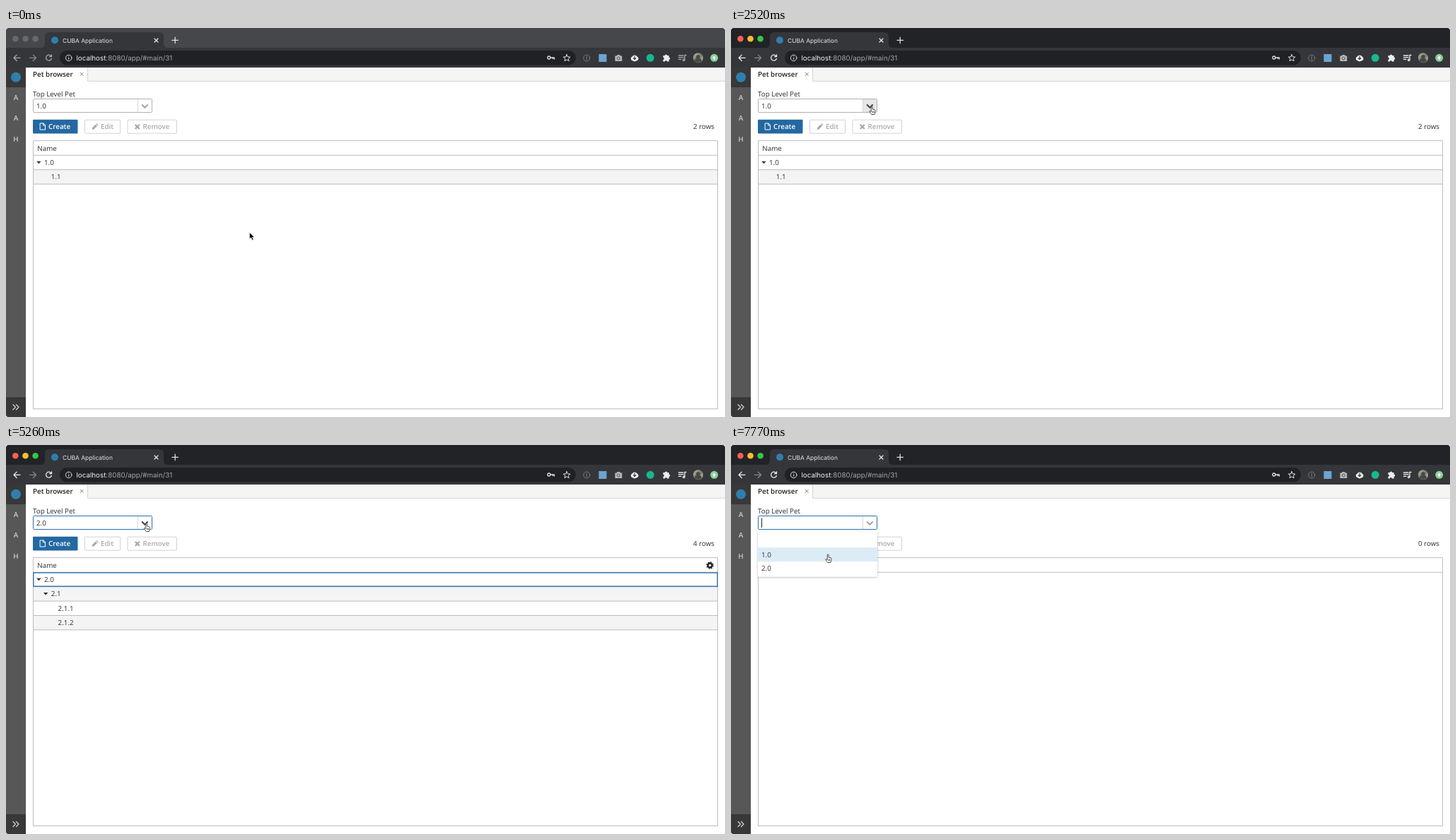
An HTML page that plays this animation: 1017 by 551 pixels, repeating every 8000 ms.

```html
<!DOCTYPE html>
<html lang="en">
<head>
<meta charset="utf-8">
<title>Pet browser</title>
<style>
  html, body { margin: 0; width: 100%; height: 100%; overflow: hidden; background: #fff; }
  svg { display: block; }
  text { font: 9.8px "Open Sans", sans-serif; fill: #2c2c2c; white-space: pre; text-rendering: geometricPrecision; }
  .ui { font-family: Inter, sans-serif; }
  .semi { font-weight: 600; }
  .off { fill: #aaa; }
  .line { fill: none; stroke-linecap: round; stroke-linejoin: round; }
  .tool { stroke: #dfe1e3; stroke-width: 1.3; }
</style>
</head>
<body>
<svg width="1017" height="551" viewBox="0 0 1017 551">
  <clipPath id="window"><rect width="1017" height="551" rx="4"/></clipPath>
  <linearGradient id="portrait" x2="1" y2="1">
    <stop stop-color="#b9bfae"/><stop offset=".5" stop-color="#77786b"/><stop offset="1" stop-color="#d5d0c8"/>
  </linearGradient>
  <filter id="shadow" x="-10%" y="-10%" width="120%" height="130%">
    <feDropShadow dx="0" dy="1" stdDeviation="1.6" flood-opacity=".28"/>
  </filter>
  <g clip-path="url(#window)">
    <!-- browser chrome -->
    <rect id="strip" width="1017" height="29"/>
    <path d="M49 28q6 0 6-6V12q0-6 6-6H217q6 0 6 6V22q0 6 6 6V29H49z" fill="#35363a"/>
    <rect y="28" width="1017" height="28" fill="#35363a"/>
    <g id="lights"><circle cx="13.3" cy="15.3" r="4.3"/><circle cx="27.5" cy="15.3" r="4.3"/><circle cx="41.6" cy="15.3" r="4.3"/></g>
    <circle cx="69" cy="17.3" r="5" fill="#2e7fad"/>
    <text class="ui" x="80" y="20.5" style="font-size:8.45px;fill:#e4e5e7">CUBA Application</text>
    <path class="line tool" d="M210 15l5 5m0-5l-5 5M235 17.4h8.4m-4.2-4.2v8.4"/>
    <path id="back" class="line" stroke-width="1.3" d="M20 42.3h-9m4.2-4.2L11 42.3l4.2 4.2"/>
    <path class="line" stroke="#85878b" stroke-width="1.3" d="M33.5 42.3h9m-4.2-4.2l4.2 4.2-4.2 4.2"/>
    <path id="reload" class="line" stroke-width="1.3" d="M64 40a4 4 0 1 0 .4 3.5M64.5 37.8v2.7h-2.8"/>
    <rect x="76" y="32" width="730" height="20.5" rx="10.2" fill="#202124"/>
    <g class="line" stroke="#dadce0"><circle cx="88.7" cy="42.4" r="4.3"/><path d="M88.7 42v2.5m0-4.6v.2"/></g>
    <text class="ui" x="99.5" y="45.8" style="fill:#a1a5aa"><tspan fill="#f1f2f3">localhost</tspan>:8080/app/#main/31</text>
    <g class="line" stroke="#e2e3e5" stroke-width="1.3">
      <circle cx="768" cy="42" r="2"/><path d="M770.5 42h5v2m-2-2v1.5"/>
      <path stroke-width="1" d="M793.2 37.6l1.4 3.2 3.5.3-2.7 2.2.9 3.4-3.1-1.8-3.1 1.8.9-3.4-2.7-2.2 3.5-.3z"/>
    </g>
    <g class="line" stroke="#77797d"><circle cx="821.3" cy="42.5" r="4.5"/><path d="M821.3 40v5"/></g>
    <rect x="838.5" y="37" width="11" height="11" fill="#6aa5d3"/>
    <path d="M861.5 39.5h2.3l1-1.5h3.2l1 1.5h2.3v7.5h-9.8z" fill="#b7b9bb"/>
    <circle cx="866.4" cy="43" r="2" fill="none" stroke="#55575a"/>
    <path d="M885.5 46a3 3 0 0 1 .3-5.500 3.800 3.800 0 0 1 6.800 0 3 3 0 0 1 .3 5.500l-3.700 1.500z" fill="#f0f1f2"/>
    <path class="line" stroke="#35363a" stroke-width="1.2" d="M889.2 40v4.5m-1.8-1.8l1.8 1.8 1.8-1.8"/>
    <circle cx="911.3" cy="42.3" r="5.5" fill="#17b890"/>
    <path d="M929.5 39h2.5a1.6 1.6 0 0 1 3.2 0h2.5v2.6a1.6 1.6 0 0 1 0 3.2v2.7h-2.7a1.5 1.5 0 0 0-3 0h-2.5v-2.7a1.5 1.5 0 0 0 0-3z" fill="#eceded"/>
    <g id="queue" class="line" stroke-width="1.3"><path d="M951.5 39h6.5m-6.5 2.7h6.5m-6.5 2.7h3.5M960 45v-6.5h2"/><circle cx="958.7" cy="45.3" r="1.2"/></g>
    <circle cx="979" cy="42.3" r="7" fill="url(#portrait)"/>
    <path d="M974 47q0-4 3-4a2.8 2.8 0 1 1 4 0q3 0 3 4-5 4-10 0z" fill="#484a42"/>
    <circle cx="1001.7" cy="42.3" r="5.5" fill="#8ccf9a"/>
    <path d="M1001.7 39.5l2.6 3h-1.6v2.3h-2v-2.3h-1.6z" fill="#fff"/>

    <!-- side menu -->
    <rect y="56" width="28" height="495" fill="#575757"/>
    <path d="M0 56h28v28H0zM0 523h28v28H0z" fill="#383838"/>
    <circle cx="14" cy="69.7" r="7" fill="#2e7fad"/>
    <g text-anchor="middle" class="semi">
      <text x="14" y="102" style="fill:#ccc" class="semi">A</text>
      <text x="14" y="131" style="fill:#ccc" class="semi">A</text>
      <text x="14" y="160.5" style="fill:#ccc" class="semi">H</text>
    </g>
    <path class="line" stroke="#ccc" stroke-width="1.4" d="M10 533.5l3.5 3.5-3.5 3.5m4.5-7l3.5 3.5-3.5 3.5"/>

    <!-- screen -->
    <rect x="28" y="56" width="989" height="495" fill="#fff"/>
    <path d="M116 56h901v19H116z" fill="#f5f5f5"/>
    <path d="M115.6 56V75.3H1017" fill="none" stroke="#d2d2d2"/>
    <text x="38" y="69" class="semi" style="fill:#222">Pet browser</text>
    <path class="line" stroke="#777" d="M105.2 63.4l4 4m0-4l-4 4"/>
    <text x="38" y="96.5">Top Level Pet</text>
    <rect x="38" y="129.8" width="63.5" height="19.8" rx="1" fill="#2468a1"/>
    <path class="line" stroke="#fff" d="M48.5 135h4.5l2.5 2.5v6.5h-7zM52.7 135v3h2.8"/>
    <text x="60" y="143.2" class="semi" style="fill:#fff">Create</text>
    <g fill="#fff" stroke="#d2d2d2"><rect x="111.5" y="130.2" width="50" height="19" rx="1"/><rect x="172" y="130.2" width="69.5" height="19" rx="1"/></g>
    <path d="M121.5 144l.6-2.7 4.7-4.7 2.2 2.2-4.7 4.7zm5.9-8l1-1 2.2 2.2-1 1z" fill="#aaa"/>
    <text x="134" y="143.2" class="semi off">Edit</text>
    <path stroke="#aaa" stroke-width="2.2" d="M182.8 136.9l6 6m0-6l-6 6"/>
    <text x="193.5" y="143.2" class="semi off">Remove</text>
    <g id="screen"></g>
    <g id="cursor"></g>
  </g>
</svg>
<script>
const $ = id => document.getElementById(id);
const BLUE = '#2d6fa7', ROW = 20.4, ITEM = 19.7;

// start, end, steps, destination of the pointer tip
const moves = [
  [520, 1200, 7, 143, 221.5],
  [1720, 2520, 10, 199, 110.5],
  [2690, 3260, 7, 118.5, 171],
  [4630, 5260, 8, 198.5, 110.5],
  [5490, 6060, 8, 146.8, 140],
  [6740, 7260, 6, 198.5, 110.5],
  [7430, 7770, 5, 137, 154.5]
];
const trees = {
  '1.0': [['1.0', 0, 1], ['1.1', 1, 0]],
  '2.0': [['2.0', 0, 1], ['2.1', 1, 1], ['2.1.1', 2, 0], ['2.1.2', 2, 0]],
  '': []
};
const options = ['', '1.0', '2.0'];
const opened = [[2690, 3540], [5490, 6570], [7430, 8000]];
const caretOn = [[2690, 3200], [3490, 4120], [4630, 5130], [5490, 6060], [6520, 7080], [7430, 8000]];
const pressed = [[3490, 3540], [6520, 6570]];

const during = (t, spans) => spans.some(([a, b]) => t >= a && t < b);
const rect = (x, y, w, h, fill, more = '') =>
  `<rect x="${x}" y="${y}" width="${w}" height="${h}" fill="${fill}" ${more}/>`;
const text = (x, y, s, more = '') => `<text x="${x}" y="${y}" ${more}>${s}</text>`;
const path = (d, more) => `<path d="${d}" ${more}/>`;

function pointer(t) {
  let x = 344.5, y = 289.5;
  for (const [start, end, steps, toX, toY] of moves) {
    if (t < start) break;
    const step = Math.min(steps, 1 + Math.floor((t - start) / (end - start) * (steps - 1) + 1e-6));
    const p = step / steps, ease = p * p * (3 - 2 * p);
    x += (toX - x) * ease;
    y += (toY - y) * ease;
  }
  return { x, y };
}

function table(value, t, tip, open) {
  const rows = trees[value];
  let fills = '', lines = '', labels = '';
  rows.forEach(([name, level, branch], i) => {
    const y = 180.3 + i * ROW, x = 54 + level * 9.8;
    const hover = !open && t > 1720 && tip.x > 39 && tip.y > y && tip.y < y + ROW;
    fills += rect(39, y, 968, ROW, hover ? '#eef4f8' : i % 2 ? '#f4f4f4' : '#fff');
    lines += `M39 ${y + ROW}H1007`;
    labels += text(x, y + 13.7, name);
    if (branch) labels += path(`M${x - 10.8} ${y + 8.4}h6.4l-3.2 3.6z`, 'fill="#333"');
  });
  let out = fills
    + path(lines + 'M38.5 159.6H1006.6V539.5H38.5zM38.5 180.3H1006.6', 'fill="none" stroke="#bcbcbc"')
    + labels;
  if (value === '2.0') out += rect(38.8, 180.9, 967.5, 19.3, 'none', `stroke="${BLUE}" stroke-width="1.4"`);
  out += text(44.3, 173.7, 'Name', 'style="font-weight:500"')
    + text(1002, 143.2, rows.length + ' rows', 'text-anchor="end"');
  if (t >= 3850 && t < 5490) {
    out += '<g fill="none" stroke="#222"><circle cx="995.7" cy="170.5" r="3" stroke-width="2.4"/>'
      + '<circle cx="995.7" cy="170.5" r="4.5" stroke-width="1.5" stroke-dasharray="1.767"/></g>';
  }
  return out;
}

function field(value, t, onButton) {
  const focused = t >= 2690;
  let out = rect(38.5, 100.5, 168, 19, '#fff', 'rx="1"');
  if (onButton && !focused) out += rect(187, 101, 19, 18, '#e6e6e6');
  out += path('M186.5 101v18', 'stroke="#d8d8d8"')
    + rect(38.5, 100.5, 168, 19, 'none', `rx="1" stroke="${focused ? BLUE : '#b0b0b0'}"`)
    + path('M192.7 109l3.7 3.7 3.7-3.7', `class="line" stroke="${onButton ? '#444' : '#a3a3a3'}" stroke-width="2"`)
    + text(43, 114.2, value);
  if (during(t, caretOn)) out += path(`M${value ? 57.5 : 43.5} 103.5v13.5`, 'stroke="#222"');
  return out;
}

function popup(value, t, tip) {
  const hovered = tip.y > 125 ? Math.floor((tip.y - 125.5) / ITEM) : -1;
  const active = hovered >= 0 && hovered < 3 ? hovered : options.indexOf(value);
  const fill = during(t, pressed) ? '#cbe6f7' : '#dbecf7';
  let out = rect(38, 122.5, 169, 64, '#fff', 'filter="url(#shadow)"')
    + rect(38, 125.5 + active * ITEM, 169, ITEM, fill);
  options.forEach((name, i) => out += text(43, 139 + i * ITEM, name));
  return out;
}

const arrow = path('M0 0V9.3L2.2 7.4 3.9 11.2 5.5 10.5 3.9 6.8H6.7z', 'fill="#000" stroke="#fff" stroke-width=".6"');
const hand = path('M-.7 6.8V1.2a.9.9 0 0 1 1.8 0V4.6l2.9.6q1.1.3 1 1.5l-.4 2.9-.7 2.4H-.2L-3 8.2q-.6-1.3.6-1.3l1.7 1.3zM1.2 7.2v2.5M2.8 7.2v2.5',
  'fill="#fff" stroke="#222" stroke-width=".8" stroke-linejoin="round"');

function draw(t) {
  const live = t >= 170;
  $('strip').setAttribute('fill', live ? '#222327' : '#45474a');
  [...$('lights').children].forEach((dot, i) =>
    dot.setAttribute('fill', live ? ['#fb5f57', '#fdbc2e', '#35c648'][i] : '#66686b'));
  for (const id of ['back', 'reload', 'queue']) $(id).setAttribute('stroke', live ? '#eceded' : '#a6a8ab');

  const tip = pointer(t);
  const value = t < 3540 ? '1.0' : t < 6570 ? '2.0' : '';
  const open = during(t, opened);
  const onButton = tip.x > 187 && tip.x < 206 && tip.y > 101 && tip.y < 119;
  const onPopup = open && tip.x < 207 && tip.y > 125 && !during(t, pressed);

  $('screen').innerHTML = table(value, t, tip, open) + field(value, t, onButton) + (open ? popup(value, t, tip) : '');
  $('cursor').innerHTML = onButton || onPopup ? hand : arrow;
  $('cursor').setAttribute('transform', `translate(${tip.x} ${tip.y})`);
}

const begin = performance.now();
function tick() {
  draw((performance.now() - begin) % 8000);
  requestAnimationFrame(tick);
}
tick();
</script>
</body>
</html>
```
